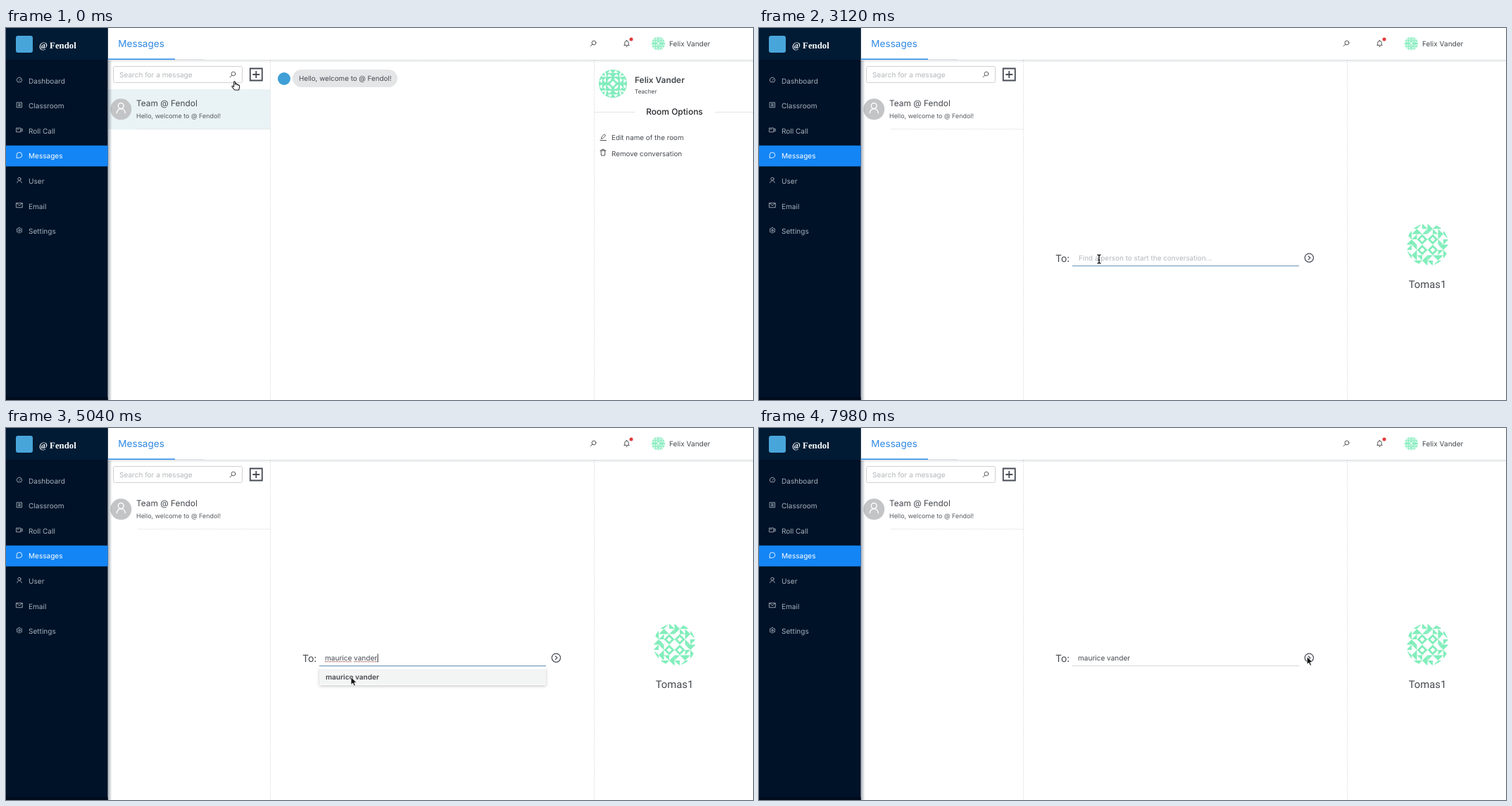
Write an HTML page that moves like this. It is 1061 by 528 pixels and loops after 8 s.

```html
<!DOCTYPE html>
<html lang="en">
<head>
<meta charset="utf-8">
<title>Messages</title>
<style>
  html, body { margin: 0; width: 100%; height: 100%; overflow: hidden; background: #fff; }
  svg { display: block; width: 1061px; height: 528px; }
  text { font-family: Inter, Roboto, sans-serif; font-size: 10.05px; fill: #45494e; text-rendering: geometricPrecision; white-space: pre; }
  .brand { font: bold 12.8px "Liberation Serif", serif; fill: #fff; }
  .line { fill: none; stroke: currentColor; stroke-linecap: round; stroke-linejoin: round; }
  .hint { fill: #b4b7ba; }
  .mid { text-anchor: middle; }
</style>
</head>
<body>
<svg viewBox="0 0 1061 528" xmlns="http://www.w3.org/2000/svg">
  <defs>
    <linearGradient id="shade"><stop stop-color="#001529" stop-opacity=".34"/><stop offset="1" stop-color="#001529" stop-opacity="0"/></linearGradient>
    <linearGradient id="under" x2="0" y2="1"><stop stop-color="#001529" stop-opacity=".13"/><stop offset="1" stop-color="#001529" stop-opacity="0"/></linearGradient>
    <filter id="lift" x="-5%" y="-30%" width="110%" height="180%"><feDropShadow dx="0" dy="1.5" stdDeviation="2" flood-opacity=".22"/></filter>
    <g id="lens" class="line"><circle cx="1" cy="-1" r="2.9"/><path d="M-1.2 1.2-3.8 3.8"/></g>
    <g id="person" class="line"><circle cy="-2" r="2.4"/><path d="M-3.6 4.2C-3.6-.6 3.6-.6 3.6 4.2"/></g>
  </defs>

  <rect width="1061" height="528" fill="#fff"/>

  <!-- conversation list -->
  <rect id="picked" x="145" y="87" width="230" height="57" fill="#e9f3f5"/>
  <path d="M187 143.5H375" stroke="#e2e3e5" stroke-dasharray="2 1"/>
  <rect x="152.5" y="54.5" width="183" height="23" rx="2" fill="#fff" stroke="#cfd1d3"/>
  <text class="hint" x="161" y="70.3">Search for a message</text>
  <use href="#lens" x="322" y="66" color="#666"/>
  <path d="M346.8 57.5H363.8V74.5H346.8ZM355.3 61V71M350.3 66H360.3" fill="none" stroke="#474b55" stroke-width="1.8"/>
  <circle cx="163.3" cy="115.3" r="15" fill="#c3c4c6"/>
  <g transform="translate(163.3 113.8) scale(1.65)" color="#fff"><use href="#person" stroke-width=".85"/></g>
  <text x="185" y="111" style="font-size:11.9px">Team @ Fendol</text>
  <text x="185" y="128.4" style="font-size:8.95px;fill:#585c61">Hello, welcome to @ Fendol!</text>
  <path d="M375.5 45V528M835.5 45V528" stroke="#e2e3e5" stroke-dasharray="2 1"/>

  <!-- open room -->
  <g id="room">
    <circle cx="395" cy="72" r="9" fill="#3f9fd6"/>
    <rect x="407" y="59" width="149" height="25" rx="12.5" fill="#e4e5e7"/>
    <text x="416" y="75" style="font-size:9.8px">Hello, welcome to @ Fendol!</text>
    <g class="petal" transform="translate(862 79)" data-r="20"></g>
    <text x="893" y="77.8" style="font-size:11.9px;font-weight:600">Felix Vander</text>
    <text x="893" y="93" style="font-size:8.2px">Teacher</text>
    <path d="M836 119.5H893M1007 119.5H1061" stroke="#e3e4e6"/>
    <text class="mid" x="949.5" y="123" style="font-size:12px;font-weight:500;fill:#25282c">Room Options</text>
    <g class="line" color="#555"><path d="M844 159.5H852.5M845.5 157 846 154.5 850 150.8 851.8 152.6 848 156.4Z"/><path d="M844 174H852M846.3 174V172.3H849.7V174M845 174 845.5 181H850.5L851 174"/></g>
    <text x="860" y="158.8" style="font-size:9.86px">Edit name of the room</text>
    <text x="860" y="181.6" style="font-size:9.86px">Remove conversation</text>
  </g>

  <!-- new conversation -->
  <g id="compose">
    <text x="421" y="331.5" style="font-size:14px">To:</text>
    <text id="hint" class="hint" x="454" y="330" style="font-size:9.92px">Find a person to start the conversation...</text>
    <text id="typed" x="453" y="330"></text>
    <g id="spell" stroke="#a8625e" stroke-width="1.1" stroke-dasharray="1.5 1"><path/><path/></g>
    <path id="caret" stroke="#333"/>
    <path id="field" d="M445 337.6H767"/>
    <g class="line" color="#474b55" stroke-width="1.2"><circle cx="781.4" cy="326.2" r="6.1"/><path d="M780.2 323.8 783 326.2 780.2 328.6"/></g>
    <g id="menu">
      <rect x="445" y="340" width="322" height="25" rx="2" fill="#fff" filter="url(#lift)"/>
      <rect id="hover" x="445" y="342" width="322" height="22" fill="#f3f4f4"/>
      <text id="option" x="454" y="356.5">maurice vander</text>
    </g>
    <g class="mosaic" transform="translate(949.5 307.5)" data-r="30"></g>
    <text class="mid" x="949.5" y="369" style="font-family:Roboto,sans-serif;font-size:14.8px">Tomas1</text>
  </g>

  <!-- header -->
  <rect x="145" width="916" height="45" fill="#fff"/>
  <rect x="145" y="45" width="916" height="4" fill="url(#under)"/>
  <path d="M240 44.5H282" stroke="#e3e5e8"/>
  <path d="M145 44.2H240" stroke="#2a8ae8" stroke-width="1.6"/>
  <text x="159.3" y="26.7" style="font-size:13.6px;fill:#2f89e0">Messages</text>
  <use href="#lens" x="834" y="22" color="#555"/>
  <path class="line" color="#555" d="M877.8 24.6H885.2M878.8 24.6V21A2.7 2.7 0 0 1 884.2 21V24.6M881.5 18.2V17.3M880.8 26.4H882.2"/>
  <circle cx="888" cy="16" r="2.5" fill="#e5383b"/>
  <g class="petal" transform="translate(926.5 22)" data-r="9.5"></g>
  <text x="942" y="25.8">Felix Vander</text>

  <!-- sidebar -->
  <rect x="144.6" y="46" width="6" height="482" fill="url(#shade)"/>
  <rect width="144.6" height="528" fill="#001228"/>
  <rect width="144.6" height="45" fill="#001b33"/>
  <rect y="524" width="144.6" height="4" fill="#000b1c"/>
  <rect y="166.8" width="144.6" height="29.6" fill="#1485f5"/>
  <rect x="14" y="11" width="24" height="24" rx="3" fill="#48a5da"/>
  <text class="brand" x="47" y="28.6">@ Fendol</text>
  <g id="nav"></g>

  <!-- pointers -->
  <g id="pointer" stroke-linejoin="round">
    <path id="arrow" d="M0 0V11L2.6 8.6 4.4 12.6 6.3 11.8 4.6 7.9H8Z" fill="#111" stroke="#fff" stroke-width=".8"/>
    <path id="hand" d="M-1.4 .8C-1.4-.6 .5-.6 .5 .8V4.5C1-.2 2.8 3.5 2.8 4.8 3.2 3.6 4.8 4 4.8 5.3 5.3 4.4 6.6 5 6.6 6.2V8.4L5.6 12H-.2L-3.9 7.6C-4.5 6.2-2.8 5.7-1.4 7.4Z" fill="#fff" stroke="#222" stroke-width="1.1"/>
    <path id="beam" d="M-2.5-6Q0-6 0-4.5 0-6 2.5-6M0-4.5V4.5M-2.5 6Q0 6 0 4.5 0 6 2.5 6M-1.3 1.3H1.3" fill="none" stroke="#111" stroke-width="1.35"/>
  </g>
</svg>

<script>
const $ = id => document.getElementById(id);
const LOOP = 8000, STEP = 60;
const NAME = 'maurice vander';
const OPEN = 660, FOCUS = 2520, KEY1 = 3420, KEY2 = 3480, MENU = 3660,
      HOVER = 4560, PICK = 4800, CLOSE = 5100, BLUR = 6300;

const icons = [
  ['Dashboard', '<path d="M-3 3.2A4.2 4.2 0 1 1 3 3.2ZM0 .8 1.8-1.2"/>'],
  ['Classroom', '<path d="M-4-4H4V4H-4ZM-1.7-1.7H1.7M-1.7 0H1.7M-1.7 1.7H1.7"/>'],
  ['Roll Call', '<path d="M-4.6-3.2H2.2V3.2H-4.6ZM2.2-1 4.8-2V2L2.2 1M-3-1.4H-1.4"/>'],
  ['Messages', '<path d="M-4.4 4.2V0A4.3 4.3 0 1 1 0 4.2Z"/>'],
  ['User', '<use href="#person"/>'],
  ['Email', '<path d="M-4.8-3.6H4.8V3.6H-4.8ZM-4.6-3.2 0 .4 4.6-3.2"/>'],
  ['Settings', '<circle r="1.5"/><path d="M0-4.6 1.4-3.4 4-2.4 3.7 0 4 2.4 1.4 3.4 0 4.6-1.4 3.4-4 2.4-3.7 0-4-2.4-1.4-3.4Z"/>']
];
$('nav').innerHTML = icons.map(([label, icon], i) => {
  const y = 75 + i * 35.6, color = i === 3 ? '#fff' : '#a9b1ba';
  return `<g class="line" color="${color}" transform="translate(19 ${y - 1.4}) scale(.88)">${icon}</g>
    <text x="32" y="${y + 3.6}" style="fill:${color}">${label}</text>`;
}).join('');

// Avatars: one quadrant (30 x 30 units) turned four times inside a circle.
function avatar(node, id, color, quadrant) {
  const turns = [0, 90, 180, 270].map(a => `<g transform="rotate(${a})">${quadrant}</g>`).join('');
  node.innerHTML = `<clipPath id="${id}"><circle r="30"/></clipPath>
    <g transform="scale(${node.dataset.r / 30})" clip-path="url(#${id})" fill="${color}">${turns}</g>`;
}
const mosaic = `<path fill-rule="evenodd" d="M7.5 0 15 7.5 7.5 15 0 7.5ZM7.5 4 11 7.5 7.5 11 4 7.5Z"/>
  <path d="M0 15H7.5L0 22.5ZM7.5 15H15V22.5ZM0 22.5H7.5V30ZM15 22.5V30H7.5Z
    M15 0H22.5V7.5ZM15 15V7.5H22.5ZM22.5 0H30L22.5 7.5ZM22.5 7.5 30 15H22.5Z
    M15 15H22.5L15 22.5ZM22.5 15H30L22.5 22.5ZM15 22.5H22.5L15 30Z"/>`;
const petal = `<path fill-rule="evenodd" d="M0 0H30V30H0Z
  M0 0H6L0 6ZM3 12Q11 11 12 3 4 4 3 12ZM14 14Q22 13 27 18 18 19 14 14ZM14 14Q13 22 18 27 19 18 14 14Z
  M15 2 21 8 15 12ZM2 15 8 21 12 15ZM23 1 29 6 23 11ZM1 23 6 29 11 23Z"/>`;
document.querySelectorAll('.mosaic').forEach((n, i) => avatar(n, 'm' + i, '#82eebb', mosaic));
document.querySelectorAll('.petal').forEach((n, i) => avatar(n, 'p' + i, '#83ecbd', petal));

// time, x, y
const path = [
  [0, 325, 76], [120, 325, 76], [540, 356.7, 69.5], [900, 356.7, 69.5],
  [1620, 468, 348], [1920, 483, 328], [4260, 483, 328], [4440, 486, 366],
  [4680, 490, 353.5], [5160, 490, 353.5], [5760, 763, 321],
  [6000, 763, 321], [6240, 778.3, 324.6], [LOOP, 778.3, 324.6]
];
const clamp = v => Math.max(0, Math.min(1, v));
const within = (t, a, b) => t >= a && t < b;
const show = (id, alpha) => $(id).setAttribute('opacity', +alpha);

function place(t) {
  const i = path.findIndex(p => p[0] > t);
  const [a, b] = [path[i - 1], path[i]];
  const k = (t - a[0]) / (b[0] - a[0]), e = k * k * (3 - 2 * k);
  return [1, 2].map(n => a[n] + (b[n] - a[n]) * e);
}

function drawPointer(t) {
  const kind = t < 300 ? 'hand'
    : within(t, 1800, 4320) || within(t, 5640, 6120) ? 'beam' : 'arrow';
  for (const id of ['hand', 'beam', 'arrow']) show(id, id === kind);
  show('pointer', !within(t, KEY1, 4260));
  $('pointer').setAttribute('transform', `translate(${place(t)})`);
}

function drawField(t) {
  const typed = t < KEY1 ? '' : t < KEY2 ? 'm' : t < PICK ? 'ma' : NAME;
  const focused = within(t, FOCUS, BLUR);
  const text = $('typed');
  if (text.textContent !== typed) text.textContent = typed;
  show('hint', !typed);

  const end = 453.5 + text.getComputedTextLength();
  const since = t - [FOCUS, KEY1, KEY2, PICK].filter(k => k <= t).pop();
  show('caret', focused && since % 1060 < 530);
  $('caret').setAttribute('d', `M${end + .5} 320.5V332.5`);

  const marked = typed === NAME && focused;
  show('spell', marked);
  if (marked) {
    const gap = NAME.indexOf(' ');
    const cut = 453 + text.getSubStringLength(0, gap);
    const next = 453 + text.getSubStringLength(0, gap + 1);
    const [a, b] = $('spell').children;
    a.setAttribute('d', `M453 331.6H${cut}`);
    b.setAttribute('d', `M${next} 331.6H${end}`);
  }
  $('field').setAttribute('stroke', focused ? '#7ba3c2' : '#d3d5d7');
  $('field').setAttribute('stroke-width', focused ? 1.2 : 1);
}

function drawMenu(t) {
  show('menu', t < MENU ? 0 : clamp(1 - (t - CLOSE + STEP) / 180));
  show('hover', t >= HOVER);
  $('option').style.fontWeight = t >= PICK ? 600 : 400;
}

function draw(t) {
  show('room', t < OPEN);
  show('compose', t >= OPEN);
  show('picked', clamp(1 - (t - OPEN) / 220));
  drawField(t);
  drawMenu(t);
  drawPointer(t);
}

const start = performance.now();
function tick() {
  const t = (performance.now() - start) % LOOP;
  draw(Math.floor(t / STEP) * STEP);
  requestAnimationFrame(tick);
}
tick();
</script>
</body>
</html>
```
